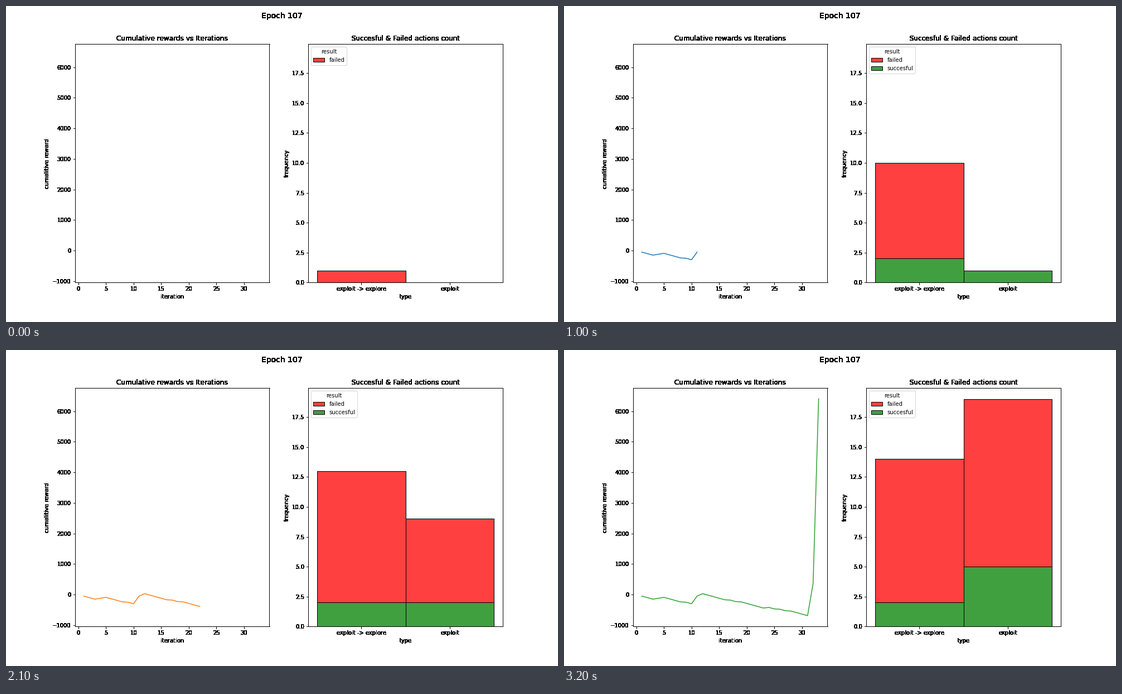
A matplotlib script for the animation above (3.3 s loop, 990 by 566 pixels).

```python
import numpy as np
import matplotlib.pyplot as plt
from matplotlib.animation import FuncAnimation
from matplotlib.patches import Patch

plt.rcParams["font.family"] = "DejaVu Sans"

W, H, DPI = 990, 566, 72
STEPS = 33

rewards = np.full(STEPS, -50)
special = {4: 30, 5: 30, 9: -10, 11: 250, 12: 80, 17: -10, 19: -10, 24: 20,
           26: -10, 28: -10, 32: 1050, 33: 6050}
for step, value in special.items():
    rewards[step - 1] = value
total = np.cumsum(rewards)
iteration = np.arange(1, STEPS + 1)

success = rewards > 0
explore = np.isin(iteration, [1, 2, 3, 4, 6, 7, 8, 9, 10, 11, 13, 14, 15, 27])
kinds = [explore, ~explore]
RED, GREEN = (1, 0, 0, 0.75), (0, 0.5, 0, 0.75)


def solid(im, dpi):
    """Turn every touched pixel fully opaque, for hard-edged black text."""
    out = np.zeros_like(im)
    out[..., 3] = im[..., 3] > 0.02
    return out, 0, 0


def harden(ax):
    for part in (ax.xaxis, ax.yaxis, ax.title, *ax.spines.values()):
        part.set_agg_filter(solid)


fig, (left, right) = plt.subplots(1, 2, figsize=(W / DPI, H / DPI), dpi=DPI,
                                  facecolor="white")
fig.subplots_adjust(left=0.125, right=0.9, bottom=0.125, top=0.88, wspace=0.2)
fig.suptitle("Epoch 107", fontsize=14).set_agg_filter(solid)

left.set(title="Cumulative rewards vs Iterations", xlabel="iteration",
         ylabel="cumalitive reward", xlim=(-0.6, 34.6))
pad = 0.05 * np.ptp(total)
left.set_ylim(total.min() - pad, total.max() + pad)
line, = left.plot([], [], lw=1.5)

right.set(title="Succesful & Failed actions count", xlabel="type",
          ylabel="frequency", xlim=(-0.6, 1.6), ylim=(0, 19 * 1.05))
right.set_xticks([0, 1], ["exploit -> explore", "exploit"])
style = dict(width=1, edgecolor="black", linewidth=1)
good_bars = right.bar([0, 1], [0, 0], facecolor=GREEN, **style)
bad_bars = right.bar([0, 1], [0, 0], facecolor=RED, **style)

for ax in (left, right):
    harden(ax)


def show_legend(with_success):
    items = [("failed", RED), ("succesful", GREEN)][:1 + with_success]
    handles = [Patch(facecolor=c, edgecolor="black", linewidth=1, label=name)
               for name, c in items]
    right.legend(handles=handles, title="result", loc="upper left")


def update(i):
    n = i + 1
    line.set_data(iteration[:n], total[:n])
    line.set_color(f"C{i % 10}")
    for kind, good_bar, bad_bar in zip(kinds, good_bars, bad_bars):
        good = np.sum(kind[:n] & success[:n])
        bad = np.sum(kind[:n] & ~success[:n])
        good_bar.set_height(good)
        bad_bar.set_y(good)
        bad_bar.set_height(bad)
        good_bar.set_visible(good > 0)
        bad_bar.set_visible(bad > 0)
    show_legend(bool(success[:n].any()))


anim = FuncAnimation(fig, update, frames=STEPS, interval=100, repeat=True,
                     repeat_delay=0, blit=False)
plt.show()
```
